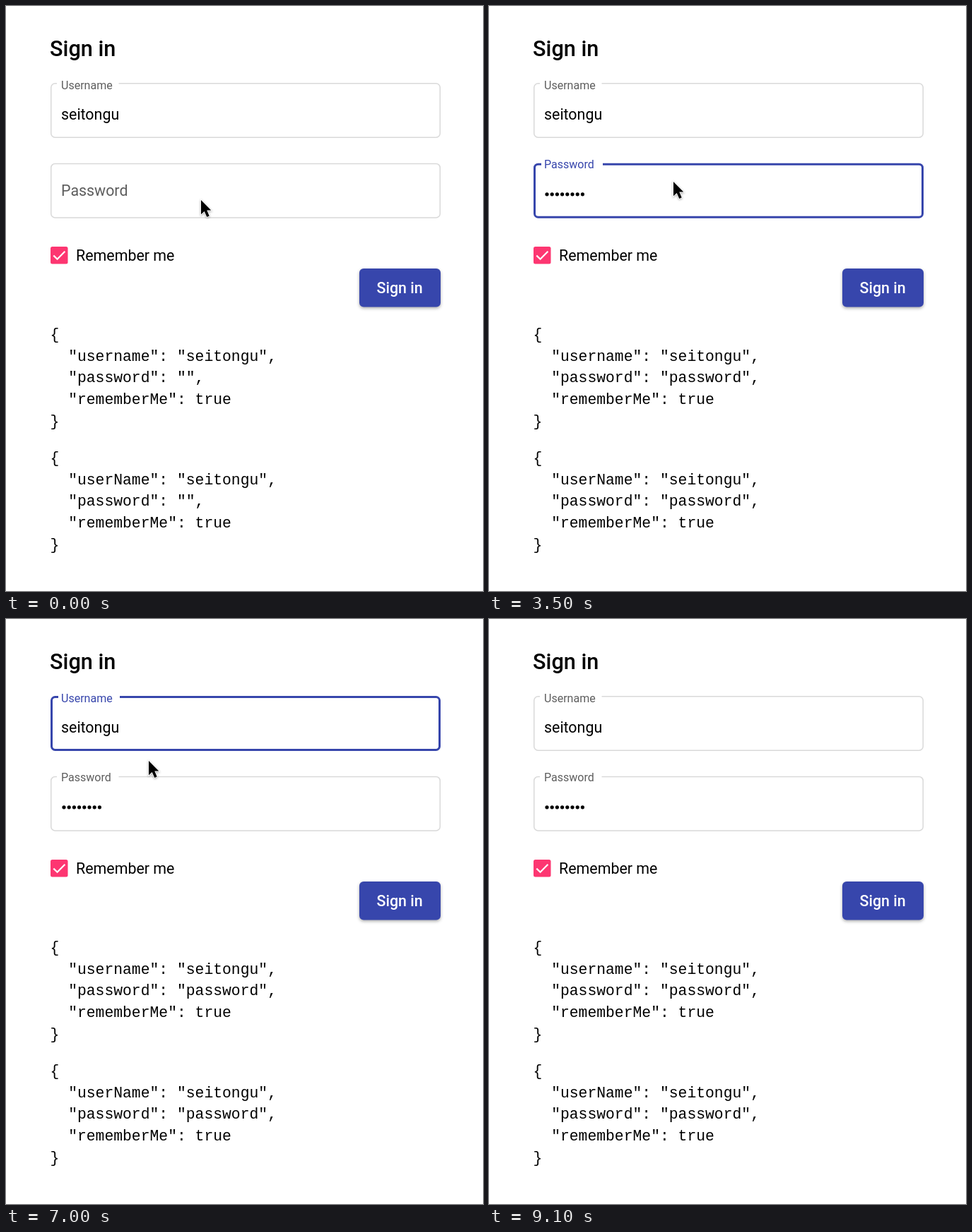
An HTML page that plays this animation: 675x829 px, repeating every 10000 ms.

```html
<!DOCTYPE html>
<html lang="en">
<head>
<meta charset="utf-8">
<title>Sign in form</title>
<style>
  html, body { margin: 0; width: 100%; height: 100%; overflow: hidden; background: #fff; }
  svg { display: block; width: 675px; height: 829px; }
  text { font: 400 21.4px Roboto, sans-serif; white-space: pre; }
  .title { font-size: 30.7px; font-weight: 500; }
  .button { fill: #3746ac; filter: drop-shadow(0 2px 2px rgba(0, 0, 0, .32)); }
  .button-text { font-weight: 500; fill: #fff; }
  .label { fill: #5e5e5e; }
  .outline { fill: none; stroke: #d9d9d9; stroke-width: 1.5; }
  .focused .label { fill: #3746ac; }
  .focused .outline { stroke: #3746ac; stroke-width: 3; }
  #json text { font: 400 21.37px "Liberation Mono", "Courier New", monospace; }
  #caret { fill: #3746ac; }
  #spelling { stroke: #ee5a50; stroke-width: 3.2; stroke-linecap: round; stroke-dasharray: 0 4.7; }
  #ring { fill: none; stroke: #000; stroke-width: 2; }
  #pointer { filter: drop-shadow(0 1px 1.5px rgba(0, 0, 0, .35)); }
</style>
</head>
<body>
<svg viewBox="0 0 675 829">
  <text class="title" x="62" y="70.5">Sign in</text>

  <g id="userField">
    <path class="outline"/>
    <text class="label" style="font-size:16.05px" x="78" y="117.5">Username</text>
  </g>
  <path id="spelling" d="M80 163.5H161"/>
  <text id="userText" x="78" y="161"></text>

  <g id="passField">
    <path class="outline"/>
    <text class="label" id="passLabel">Password</text>
  </g>
  <text id="placeholder" x="78" y="274.5">Password</text>
  <g id="dots"></g>
  <rect id="caret" width="1.5" height="23"/>

  <circle id="ripple" cx="75" cy="353" r="30"/>
  <rect id="box" x="63" y="341" width="24.5" height="24.5" rx="2.5"/>
  <path id="tick" d="M67.3 353.6L72.6 358.8L83.4 347.8" fill="none" stroke="#fff" stroke-width="2.2"/>
  <text x="99" y="361">Remember me</text>

  <rect class="button" x="500" y="372" width="115" height="54.5" rx="6"/>
  <text class="button-text" x="524.5" y="407">Sign in</text>

  <g id="json"></g>

  <circle id="ring"/>
  <g id="pointer">
    <path id="arrow" d="M0 0V20.3L4.7 15.9L8.3 24L11.7 22.5L8.3 14.6H14.3Z" stroke="#fff" stroke-width="1.6" paint-order="stroke"/>
    <path id="beam" d="M-4.5 -12.5Q0 -12.5 0 -9V10Q0 13.5 -4.5 13.5M4.5 -12.5Q0 -12.5 0 -9M0 10Q0 13.5 4.5 13.5M-3 4H3" fill="none" stroke="#000" stroke-width="1.7"/>
    <g id="hand" fill="#fff" stroke="#000" stroke-width="1.7" stroke-linejoin="round">
      <path d="M-2.6 2.5Q-2.6 0 -.2 0Q2 0 2.5 2.5L4 9.5Q6.5 8.2 8 10Q10.3 8.9 11.7 11Q15 10.5 15 14V18Q15 20 13 23V26H1.5Q1.2 23 -2.5 19.5L-6.5 14.8Q-7 12 -4.5 12.2L-.7 14.8Z"/>
      <path d="M4 15.5V21M7.3 15.5V21M10.5 15.5V21" stroke-width="1.4"/>
    </g>
  </g>
</svg>
<script>
const LOOP = 10000, STEP = 100;
const NAME = 'seitongu', PASSWORD = 'password';
const KEYS = [1500, 1700, 1900, 2100, 2400, 2600, 2800, 3000];
const CLICKS = [540, 4238, 7798, 8398];
const FOCUS_PASS = 600, FOCUS_USER = 4200, BLUR = 7850;
const CARET_USER = [[4200, 4800], [5000, 5600], [6000, 6600], [7100, 7600]];
const CARET_PASS = [[600, 1100], [1500, 3500]];
const PATH = [
  [0, 276, 275], [300, 276, 275], [800, 263, 252], [1200, 261, 249], [3500, 261, 249],
  [4200, 222, 165], [6900, 222, 165], [7000, 202, 201], [7700, 80, 351], [LOOP, 80, 351]
];

const $ = id => document.getElementById(id);
const NS = 'http://www.w3.org/2000/svg';
const within = (t, from, to) => t >= from && t < to;
const clamp = x => Math.min(1, Math.max(0, x));
const set = (el, attrs) => {
  for (const key in attrs) el.setAttribute(key, attrs[key]);
  return el;
};
const add = (parent, tag, attrs) => parent.appendChild(set(document.createElementNS(NS, tag), attrs));
const show = (el, on) => { el.style.display = on ? '' : 'none'; };

const dots = [...PASSWORD].map((_, i) => add($('dots'), 'circle', { cx: 82 + 7.2 * i, cy: 266.8, r: 2.6 }));
const lines = [471.8, 646.8].map(top =>
  Array.from({ length: 5 }, (_, i) => add($('json'), 'text', { x: 62.5, y: top + 30.7 * i })));

function drawField(id, top, focused, notched) {
  const field = $(id), inset = focused ? 1.5 : .75;
  const l = 63 + inset, r = 615 - inset, t = top + inset, b = top + 78 - inset, c = 6.5 - inset;
  const from = notched ? (focused ? 74 : 72) : 100, to = notched ? (focused ? 161 : 159.5) : 100;
  field.setAttribute('class', focused ? 'focused' : '');
  set(field.querySelector('.outline'), {
    d: `M${to} ${t}H${r - c}a${c} ${c} 0 0 1 ${c} ${c}V${b - c}a${c} ${c} 0 0 1 ${-c} ${c}` +
       `H${l + c}a${c} ${c} 0 0 1 ${-c} ${-c}V${t + c}a${c} ${c} 0 0 1 ${c} ${-c}H${from}`
  });
}

function pointerAt(t) {
  const i = PATH.findIndex(p => p[0] > t);
  const [t0, x0, y0] = PATH[i - 1], [t1, x1, y1] = PATH[i];
  const k = 1 - (1 - (t - t0) / (t1 - t0)) ** 2;
  return [x0 + (x1 - x0) * k, y0 + (y1 - y0) * k];
}

function drawForm(t, user, typed) {
  const passFocus = within(t, FOCUS_PASS, FOCUS_USER), userFocus = within(t, FOCUS_USER, BLUR);
  const lift = clamp((t - FOCUS_PASS) / 400), k = 1 - (1 - lift) ** 3.6;
  drawField('userField', 109, userFocus, true);
  drawField('passField', 222.7, passFocus, t >= FOCUS_PASS);
  $('passLabel').style.fontSize = 21.4 - 5.35 * k + 'px';
  set($('passLabel'), { x: 78, y: 268.7 - 39.2 * k });

  $('userText').textContent = user;
  show($('spelling'), within(t, FOCUS_USER, 5000));
  show($('placeholder'), passFocus && !typed);
  set($('placeholder'), { 'fill-opacity': .42 * lift });
  dots.forEach((dot, i) => show(dot, i < typed));

  const lit = spans => spans.some(([from, to]) => within(t, from, to));
  show($('caret'), lit(CARET_USER) || lit(CARET_PASS));
  set($('caret'), userFocus
    ? { x: 161.3 + 12 * (user.length - NAME.length), y: 143 }
    : { x: 78.4 + 7.2 * typed, y: 256 });
}

function drawCheckbox(t, checked, hover) {
  const pulse = [7850, 8450].reduce((sum, at) =>
    sum + (t >= at ? .1 * clamp(1 - (t - at) / 400) : 0), 0);
  set($('box'), checked
    ? { fill: '#fd3671', stroke: 'none' }
    : { fill: '#fff', stroke: '#757575', 'stroke-width': 3, x: 64.5, y: 342.5, width: 21.5, height: 21.5 });
  if (checked) set($('box'), { x: 63, y: 341, width: 24.5, height: 24.5 });
  show($('tick'), checked);
  show($('ripple'), hover);
  set($('ripple'), { fill: checked ? '#fd3671' : '#000', 'fill-opacity': .055 + pulse });
}

function drawJson(user, pass, checked) {
  lines.forEach((block, i) => {
    const rows = ['{', `  "${i ? 'userName' : 'username'}": "${user}",`,
      `  "password": "${pass}",`, `  "rememberMe": ${checked}`, '}'];
    rows.forEach((row, j) => { block[j].textContent = row; });
  });
}

function drawPointer(t, x, y) {
  const hand = x < 100, beam = y < 187;
  show($('pointer'), t < 9100);
  set($('pointer'), { transform: `translate(${x} ${y})` });
  show($('hand'), hand);
  show($('beam'), beam);
  show($('arrow'), !hand && !beam);

  const click = CLICKS.find(at => within(t, at, at + 140));
  show($('ring'), click !== undefined);
  if (click !== undefined) set($('ring'), { cx: x, cy: y, r: 47.5 * (1 - (t - click) / 140) });
}

function render(t) {
  const user = NAME + (within(t, 5000, 6100) ? '1' : '');
  const typed = KEYS.filter(at => t >= at).length;
  const checked = !within(t, 7850, 8450);
  const [x, y] = pointerAt(t);
  drawForm(t, user, typed);
  drawCheckbox(t, checked, x < 105 && t < 9100);
  drawJson(user, PASSWORD.slice(0, typed), checked);
  drawPointer(t, x, y);
}

const start = performance.now();
function tick() {
  const t = (performance.now() - start) % LOOP;
  render(Math.floor(t / STEP) * STEP);
  requestAnimationFrame(tick);
}
tick();
</script>
</body>
</html>
```
